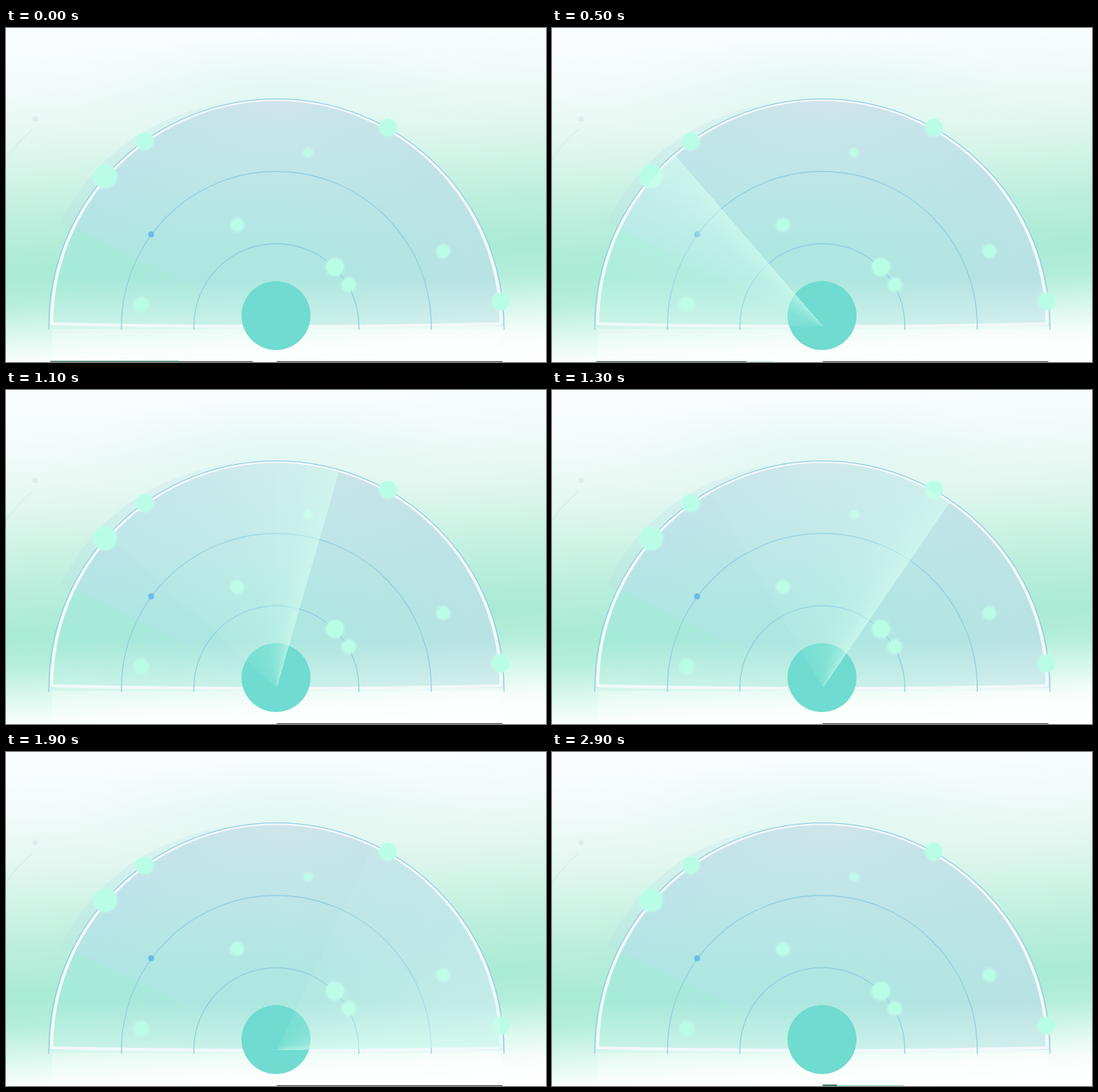
These frames come from a looping animation (720x446 px, 3 s). An HTML page:

```html
<!DOCTYPE html>
<html lang="en">
<head>
<meta charset="utf-8">
<title>Radar sweep</title>
<style>
  html, body { margin: 0; width: 100%; height: 100%; overflow: hidden; background: #fff; }
  #stage { position: relative; width: 720px; height: 446px; overflow: hidden; }
  svg { position: absolute; left: 0; top: 0; display: block; }
  #sweep { position: absolute; left: 60.5px; top: 98px; width: 600px; height: 300px; border-radius: 300px 300px 0 0; }
</style>
</head>
<body>
<div id="stage">
  <svg width="720" height="446" viewBox="0 0 720 446">
    <defs>
      <linearGradient id="sky" gradientUnits="userSpaceOnUse" x1="348" y1="0" x2="372" y2="446">
        <stop offset="0" stop-color="#fafdff"/>
        <stop offset=".13" stop-color="#f3fbfa"/>
        <stop offset=".27" stop-color="#e6f8f2"/>
        <stop offset=".4" stop-color="#d4f4e8"/>
        <stop offset=".55" stop-color="#bbeedc"/>
        <stop offset=".69" stop-color="#a9ebd5"/>
        <stop offset=".78" stop-color="#b4eeda"/>
        <stop offset=".88" stop-color="#dcf8ee"/>
        <stop offset=".95" stop-color="#f6fdfa"/>
        <stop offset="1" stop-color="#fdfffe"/>
      </linearGradient>
      <radialGradient id="haze">
        <stop offset="0" stop-color="#d8f7ee" stop-opacity=".55"/>
        <stop offset="1" stop-color="#d8f7ee" stop-opacity="0"/>
      </radialGradient>
      <linearGradient id="disc" x2="0" y2="1">
        <stop offset="0" stop-color="#cfe5ea"/>
        <stop offset=".3" stop-color="#c0e6e8"/>
        <stop offset=".65" stop-color="#aee7e2"/>
        <stop offset="1" stop-color="#a8e7dc"/>
      </linearGradient>
      <linearGradient id="right">
        <stop offset=".5" stop-color="#bfe0e5" stop-opacity="0"/>
        <stop offset="1" stop-color="#bfe0e5" stop-opacity=".75"/>
      </linearGradient>
      <linearGradient id="left" x2=".6" y2=".5">
        <stop offset="0" stop-color="#b4dcea" stop-opacity=".45"/>
        <stop offset="1" stop-color="#b4dcea" stop-opacity=".04"/>
      </linearGradient>
      <linearGradient id="low">
        <stop offset="0" stop-color="#a4ebd5" stop-opacity=".75"/>
        <stop offset="1" stop-color="#a4ebd5" stop-opacity="0"/>
      </linearGradient>
      <linearGradient id="mist" gradientUnits="userSpaceOnUse" x1="0" y1="335" x2="0" y2="400">
        <stop offset="0" stop-color="#effcf8" stop-opacity="0"/>
        <stop offset="1" stop-color="#effcf8" stop-opacity=".5"/>
      </linearGradient>
      <radialGradient id="glow">
        <stop offset=".6" stop-color="#c8ffee" stop-opacity=".6"/>
        <stop offset="1" stop-color="#c8ffee" stop-opacity="0"/>
      </radialGradient>
      <path id="half" d="M57 398A303.5 303.5 0 0 1 664 398Z"/>
    </defs>
    <rect width="720" height="446" fill="url(#sky)"/>
    <ellipse cx="360" cy="90" rx="270" ry="80" fill="url(#haze)"/>
    <path d="M0 175Q14 153 36 135" fill="none" stroke="#bfe3e0" opacity=".6"/>
    <circle cx="39" cy="121" r="3.5" fill="#cfe8e6" opacity=".6"/>
    <path d="M61 402H662V446H61Z" fill="#fff" opacity=".3"/>

    <use href="#half" fill="url(#disc)"/>
    <use href="#half" fill="url(#right)"/>
    <path d="M360.5 398H57A303.5 303.5 0 0 1 88 264Z" fill="url(#low)"/>
    <path d="M360.5 398L73 260C110 180 200 94 360 94Z" fill="url(#left)"/>
    <use href="#half" fill="url(#mist)"/>

    <path d="M61 395A299.5 299.5 0 0 1 660 395Q360 402 61 395Z" fill="none" stroke="#f3f8fa" stroke-width="4" stroke-linejoin="round"/>
    <g id="rings" fill="none" stroke="#92cfe2" stroke-width="1.3"></g>
    <circle cx="193.5" cy="275.5" r="4" fill="#69bbea"/>
    <g id="dots"></g>
    <circle cx="360" cy="384" r="46" fill="#70dbd0"/>
  </svg>
  <div id="sweep"></div>
  <svg width="720" height="446" viewBox="0 0 720 446"><g id="bars"></g></svg>
</div>
<script>
const LOOP = 3000, STEP = 100, TAIL = 64;
const $ = id => document.getElementById(id);

$('rings').innerHTML = [303.5, 206.5, 110].map(r =>
  `<path d="M${360.5 - r} 403V398A${r} ${r} 0 0 1 ${360.5 + r} 398V403"/>`).join('');

// x, y, radius
const dots = [
  [132, 198, 15.5], [185, 151, 11.5], [509.5, 133, 11.5], [403, 166.5, 4.5], [308, 263, 8],
  [438.5, 319, 11.5], [457, 342.5, 8.5], [583, 298, 8], [660, 365, 11.5], [180, 369, 9]
];
$('dots').innerHTML = dots.map(([x, y, r]) =>
  `<circle cx="${x}" cy="${y}" r="${r + 4}" fill="url(#glow)"/>` +
  `<circle cx="${x}" cy="${y}" r="${r}" fill="#b9fde6"/>`).join('');

// time, angle of the leading edge above the left horizon
const turn = [[0, 0], [300, 29], [700, 69.3], [1900, 179.2], [2600, 244]];

// start, end, x1, x2, colour, height
const bars = [
  [0, 300, 59, 231, '#3f7f68', 1.5],
  [0, 300, 231, 329, '#3f4c4c', 1],
  [300, 600, 59, 259, '#35594e', 1],
  [300, 600, 259, 295, '#b5ecdc', 1],
  [0, 2400, 361, 662, '#3f4c50', 1],
  [2400, 3000, 361, 380, '#3f7f68', 2],
  [2400, 3000, 380, 470, '#84dcbe', 1]
];

function angleAt(t) {
  const i = turn.findIndex(k => k[0] >= t);
  if (i < 1) return i ? null : 0;
  const [t0, a0] = turn[i - 1], [t1, a1] = turn[i];
  return a0 + (a1 - a0) * (t - t0) / (t1 - t0);
}

function draw(t) {
  const lead = angleAt(t), mint = a => `rgba(214,255,240,${a})`;
  $('sweep').style.background = lead === null ? 'none' :
    `conic-gradient(from ${270 + lead - TAIL}deg at 50% 100%, ${mint(.08)} 0deg, ${mint(.18)} 36deg, ` +
    `${mint(.36)} 54deg, ${mint(.6)} ${TAIL}deg, ${mint(0)} ${TAIL + .15}deg)`;
  $('bars').innerHTML = bars.filter(b => t >= b[0] && t < b[1]).map(([, , a, b, fill, h]) =>
    `<rect x="${a}" y="${446 - h}" width="${b - a}" height="${h}" fill="${fill}"/>`).join('');
}

const start = performance.now();
let shown = -1;
function tick() {
  const t = Math.floor((performance.now() - start) % LOOP / STEP) * STEP;
  if (t !== shown) draw(shown = t);
  requestAnimationFrame(tick);
}
tick();
</script>
</body>
</html>
```
